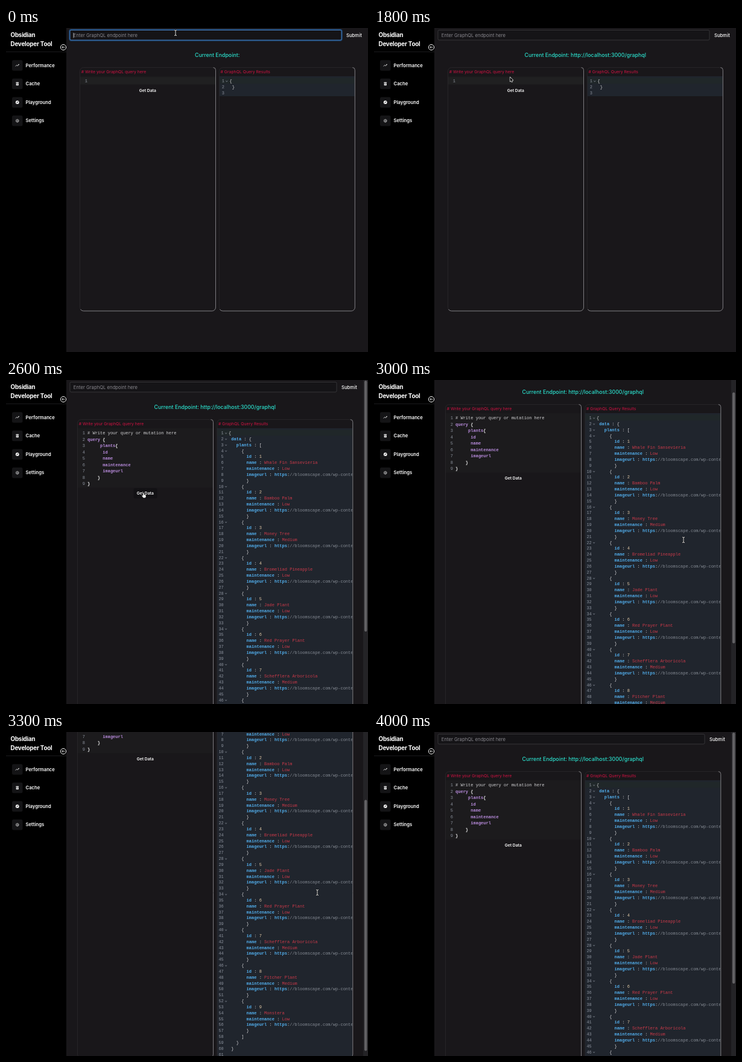
Write an HTML page with a canvas that moves like this. It is 600 by 537 pixels and loops after 4.1 s.

```html
<!DOCTYPE html>
<html lang="en">
<head>
<meta charset="utf-8">
<title>Developer tool playground</title>
<style>
html, body { margin: 0; width: 100%; height: 100%; overflow: hidden; background: #19171a; }
canvas { display: block; }
</style>
</head>
<body>
<canvas id="stage" width="600" height="537"></canvas>
<script>
const ctx = document.getElementById('stage').getContext('2d');
const LOOP = 4100, STEP = 100;
const SUBMITTED = 500, PASTED_URL = 200, PASTED_QUERY = 2000, RESULTS = 2500;
const UI = 'Inter, sans-serif', MONO = '"Liberation Mono", "Courier New", monospace';
const CODE = 7.02, CH = CODE * 0.6;
const C = {
  bg: '#19171a', blue: '#52aeec', red: '#cc3a4a', rose: '#cf1242', teal: '#2bdfcc',
  purple: '#b88bdc', light: '#d2d2d4', gutter: '#8b919c', faint: '#848a93', num: '#e3cba8'
};
const BOLD = new Set([C.blue, C.purple, '#eeeeee']);
const URL_TEXT = 'http://localhost:3000/graphql';
const IMAGE = '//bloomscape.com/wp-content/uploads';
const PLANTS = [
  ['Whale Fin Sansevieria', 'Low'], ['Bamboo Palm', 'Low'], ['Money Tree', 'Medium'],
  ['Bromeliad Pineapple', 'Low'], ['Jade Plant', 'Low'], ['Red Prayer Plant', 'Low'],
  ['Schefflera Arboricola', 'Medium'], ['Pitcher Plant', 'Medium'], ['Monstera', 'Low']
];

// A code line is an indent followed by [text, colour] parts.
const punct = (indent, s) => ({ indent, parts: [[s, C.light]] });
const field = (indent, key, ...value) => ({ indent, parts: [[key, C.blue], [' : ', C.light], ...value] });
const EMPTY_RESULT = [{ ...punct(0, '{'), fold: true }, punct(1, '}'), punct(0, '')];
const RESULT = [
  { ...punct(0, '{'), fold: true },
  { ...field(1, 'data', ['{', C.light]), fold: true },
  { ...field(3, 'plants', ['[', C.light]), fold: true },
  ...PLANTS.flatMap(([name, care], i) => [
    { ...punct(5, '{'), fold: true },
    field(7, 'id', [String(i + 1), C.num]),
    field(7, 'name', [name, C.red]),
    field(7, 'maintenance', [care, C.red]),
    field(7, 'imageurl', ['https', C.blue], [':', C.light], [IMAGE, C.faint]),
    punct(7, '}')
  ]),
  punct(5, ']'), punct(3, '}'), punct(1, '}'), punct(0, '')
];
const word = (indent, s, tail = '') => ({ indent, parts: [[s, C.purple], [tail, '#eeeeee']] });
const QUERY = [
  punct(0, '# Write your query or mutation here'), word(0, 'query', ' {'), word(5, 'plants', '{'),
  word(6, 'id'), word(6, 'name'), word(6, 'maintenance'), word(6, 'imageurl'),
  word(4, '', '}'), word(0, '', '}')
];

// [time, x, y]
const POINTER = [
  [0, 281, 8], [200, 283, 9], [300, 350, 20], [400, 500, 22], [500, 571, 14], [700, 571, 14],
  [800, 520, 35], [900, 440, 53], [1200, 330, 54], [1400, 290, 64], [1600, 245, 76], [1800, 225, 81],
  [1900, 222, 88], [2000, 222, 88], [2300, 227, 187], [2600, 227, 187], [2700, 300, 212],
  [2900, 512, 264], [3100, 514, 266], [3300, 516, 266], [3700, 516, 266]
];
const SHAPES = [[0, 'beam'], [300, 'arrow'], [500, 'hand'], [800, 'arrow'], [1900, 'beam'],
  [2100, 'arrow'], [2300, 'hand'], [2700, 'arrow'], [2800, 'beam'], [3700, 'none']];
const SCROLL = [[2900, 0], [3000, 25], [3100, 64.5], [3200, 106], [3300, 143.5], [3400, 154],
  [3600, 154], [3700, 112], [3800, 55], [3900, 10], [4000, 0]];

function track(keys, t) {
  const next = keys.findIndex(k => k[0] > t);
  if (next < 0) return keys[keys.length - 1].slice(1);
  if (next === 0) return keys[0].slice(1);
  const a = keys[next - 1], b = keys[next], u = (t - a[0]) / (b[0] - a[0]);
  return a.slice(1).map((v, i) => v + (b[i + 1] - v) * u);
}

// Text is laid out ten times larger so that small sizes keep fractional advances.
function text(s, x, cy, size, color, { weight = 400, align = 'left', family = UI, spacing = 0 } = {}) {
  ctx.save();
  ctx.translate(x, cy + size * 0.35);
  ctx.scale(0.1, 0.1);
  ctx.font = `${weight} ${size * 10}px ${family}`;
  ctx.letterSpacing = `${spacing * 10}px`;
  ctx.textAlign = align;
  ctx.fillStyle = color;
  ctx.fillText(s, 0, 0);
  ctx.restore();
}

function rect(x, y, w, h, fill, r = 0) {
  ctx.beginPath();
  ctx.roundRect(x, y, w, h, r);
  ctx.fillStyle = fill;
  ctx.fill();
}

function line(color, width, ...pts) {
  ctx.beginPath();
  pts.forEach(([x, y]) => ctx.lineTo(x, y));
  ctx.strokeStyle = color;
  ctx.lineWidth = width;
  ctx.stroke();
}

function ring(x, y, r, color, width) {
  ctx.beginPath();
  ctx.arc(x, y, r, 0, Math.PI * 2);
  ctx.strokeStyle = color;
  ctx.lineWidth = width;
  ctx.stroke();
}

function codeLines(lines, textX, numberX, y, step) {
  lines.forEach(({ indent, parts, fold }, i) => {
    const cy = y + i * step;
    text(String(i + 1), numberX, cy, CODE, C.gutter, { family: MONO, align: 'right' });
    if (fold) line(C.gutter, 0.9, [numberX + 2.3, cy], [numberX + 3.8, cy + 1.3], [numberX + 5.3, cy]);
    let x = textX + indent * CH;
    for (const [s, color] of parts) {
      text(s, x, cy, CODE, color, { family: MONO, weight: BOLD.has(color) ? 700 : 400 });
      x += s.length * CH;
    }
  });
}

function panel(x, y, w, h) {
  const r = 6, right = x + w, bottom = y + h;
  ctx.beginPath();
  ctx.roundRect(x, y, w, h, r);
  ctx.strokeStyle = '#272528';
  ctx.lineWidth = 1;
  ctx.stroke();
  ctx.beginPath();
  ctx.moveTo(right - 4, y);
  ctx.arcTo(right, y, right, y + r, 4);
  ctx.arcTo(right, bottom, right - r, bottom, r);
  ctx.lineTo(x + r, bottom);
  ctx.quadraticCurveTo(x + 2, bottom, x + 1, bottom - 3);
  ctx.strokeStyle = '#7d7c80';
  ctx.stroke();
}

function clipped(x, y, w, h, paint) {
  ctx.save();
  ctx.beginPath();
  ctx.rect(x, y, w, h);
  ctx.clip();
  paint();
  ctx.restore();
}

const ICONS = [
  (x, y) => line('#e6e6e6', 0.9, [x - 3, y + 1.5], [x - 1, y - 0.5], [x + 0.5, y + 0.7], [x + 3, y - 1.6], [x + 1.4, y - 1.6]),
  (x, y) => {
    rect(x - 2.4, y - 2.8, 4.8, 1.5, '#eeeeee', 0.5);
    rect(x - 2.1, y - 0.8, 4.2, 3.5, '#eeeeee', 0.6);
    line('#141416', 0.7, [x - 1, y + 0.7], [x + 1, y + 0.7]);
  },
  (x, y) => {
    ctx.beginPath();
    ctx.arc(x, y, 2.9, 0, Math.PI * 2);
    ctx.fillStyle = '#eeeeee';
    ctx.fill();
    line('#141416', 1, [x - 1.2, y + 1.2], [x + 1.3, y - 1.3]);
  },
  (x, y) => {
    ring(x, y, 2.1, '#cccccc', 0.8);
    ring(x, y, 0.8, '#cccccc', 0.6);
    for (let i = 0; i < 8; i++) {
      const a = i * Math.PI / 4, c = Math.cos(a), s = Math.sin(a);
      line('#cccccc', 0.8, [x + c * 2.2, y + s * 2.2], [x + c * 3, y + s * 3]);
    }
  }
];

function sidebar() {
  rect(0, 0, 100, 537, '#000000');
  const title = { weight: 700, spacing: -0.25 };
  text('Obsidian', 7.5, 11.5, 9.9, '#ffffff', title);
  text('Developer Tool', 7.5, 26.5, 9.9, '#ffffff', title);
  line('#1b1b1d', 1, [0, 39.5], [100, 39.5]);
  ['Performance', 'Cache', 'Playground', 'Settings'].forEach((label, i) => {
    const y = 62 + i * 30.6;
    rect(10, y - 8.8, 17.5, 17.5, '#141416', 2.5);
    ICONS[i](18.8, y);
    text(label, 32.5, y, 7.7, '#ffffff', { weight: 600 });
  });
  ctx.beginPath();
  ctx.arc(95, 32, 4.8, 0, Math.PI * 2);
  ctx.fillStyle = '#000000';
  ctx.fill();
  ring(95, 32, 4.6, '#f2f2f2', 1);
  line('#f2f2f2', 0.9, [97.5, 32], [92.8, 32]);
  line('#f2f2f2', 0.9, [94.6, 30.1], [92.7, 32], [94.6, 33.9]);
}

function topBar(t, loaded) {
  const right = loaded ? 548 : 556;
  const focused = t < SUBMITTED;
  const typed = focused && t >= PASTED_URL;
  if (focused) {
    ctx.beginPath();
    ctx.roundRect(105.5, 3, right - 105, 17.5, 2.5);
    ctx.strokeStyle = '#1d4672';
    ctx.lineWidth = 2.4;
    ctx.stroke();
  }
  rect(106, 3.5, right - 106, 16.5, '#151417', 2);
  ctx.strokeStyle = focused ? '#4a87cc' : '#39383c';
  ctx.lineWidth = 0.9;
  ctx.stroke();
  text(typed ? URL_TEXT : 'Enter GraphQL endpoint here', 111.8, 12.3, 7.7, typed ? '#f0f0f0' : '#88878d');
  if (focused && !typed) line('#dddddd', 0.7, [112, 8], [112, 16.5]);
  if (t >= SUBMITTED && t < 800) rect(558, 4, 37, 17.5, '#121114', 2.5);
  text('Submit', right + 8, 12.7, 7.7, '#ffffff', { weight: 500 });
  const endpoint = 'Current Endpoint: ' + (t >= SUBMITTED ? URL_TEXT : '');
  text(endpoint.trim(), loaded ? 346.3 : 350.2, 44.5, 8.8, C.teal, { weight: 500, align: 'center' });
}

function panels(t, loaded) {
  const dx = loaded ? -4 : 0;
  const query = t >= PASTED_QUERY ? QUERY : [punct(0, '')];
  const left = 122 + dx, right = 353 + dx + (loaded ? 0.5 : 0);
  const height = loaded ? 618 : 403.5;
  const codeHeight = query.length * 10.5 + 4;

  rect(left, 80, 225, codeHeight, '#1c1b1d');
  if (query.length === 1) rect(left, 81.5, 225, 11.5, '#202021');
  text('# Write your GraphQL query here', left + 2.7, 73, 6.85, C.rose);
  codeLines(query, left + 17, left + 13, 88, 10.5);

  const buttonY = 80 + codeHeight + 9.2;
  if (t >= 2300 && t < 2700) rect(left + 93.5, buttonY - 8.5, 39, 17, '#121114', 2.5);
  text('Get Data', left + 112.8, buttonY, 6.7, '#ffffff', { weight: 600, align: 'center' });

  const results = loaded ? RESULT : EMPTY_RESULT;
  rect(right, 80, 225, loaded ? 604 : 33, '#20252d');
  rect(right, 82.5, 225, 9.8, '#202729');
  text('# GraphQL Query Results', right + 2.6, 73, 6.85, C.rose);
  clipped(right, 60, 225, 630, () =>
    codeLines(results, right + (loaded ? 19.6 : 17.6), right + (loaded ? 11.3 : 9), 87.6, 9.835));

  panel(left + 0.5, 65.5, 225, height);
  panel(right + 0.3, 65.5, 225, height);
}

function scrollbar(scroll) {
  rect(592, 0, 8, 537, '#242326');
  rect(594, 1 + scroll * 537 / 691, 4.4, 416, '#626164', 2.2);
}

function outline(pts, fill, stroke) {
  ctx.beginPath();
  pts.forEach(([x, y]) => ctx.lineTo(x, y));
  ctx.closePath();
  ctx.lineJoin = 'round';
  ctx.strokeStyle = stroke;
  ctx.lineWidth = 1.3;
  ctx.stroke();
  ctx.fillStyle = fill;
  ctx.fill();
}

const CURSORS = {
  none() {},
  arrow() {
    outline([[0.5, 0.5], [0.5, 7.6], [2.1, 6.1], [3.2, 8.5], [4.4, 8], [3.4, 5.7], [5.5, 5.6]], '#0a0a0a', '#f2f2f2');
  },
  hand() {
    outline([[0, 0], [1.3, 0], [1.6, 3], [4.7, 3.8], [4.9, 6], [4, 8.2], [0.5, 8.2], [-2, 4.8], [-1.3, 4.1], [0.1, 5]],
      '#f4f4f4', '#0a0a0a');
  },
  beam() {
    for (const [color, width] of [['#0a0a0a', 2.2], ['#e8e8e8', 1]]) {
      line(color, width, [0, -4], [0, 4]);
      line(color, width, [-2, -4.6], [0, -3.8], [2, -4.6]);
      line(color, width, [-2, 4.6], [0, 3.8], [2, 4.6]);
    }
  }
};

function pointer(t) {
  const [x, y] = track(POINTER, t);
  const shape = SHAPES.filter(([start]) => start <= t).pop()[1];
  ctx.save();
  ctx.translate(x, y);
  CURSORS[shape]();
  ctx.restore();
}

function draw(t) {
  const loaded = t >= RESULTS;
  const [scroll] = track(SCROLL, t);
  rect(0, 0, 600, 537, C.bg);
  ctx.save();
  ctx.translate(0, -scroll);
  topBar(t, loaded);
  panels(t, loaded);
  ctx.restore();
  if (loaded) scrollbar(scroll);
  sidebar();
  pointer(t);
}

const start = performance.now();
function tick() {
  const t = (performance.now() - start) % LOOP;
  draw(Math.floor(t / STEP) * STEP);
  requestAnimationFrame(tick);
}
tick();
</script>
</body>
</html>
```
